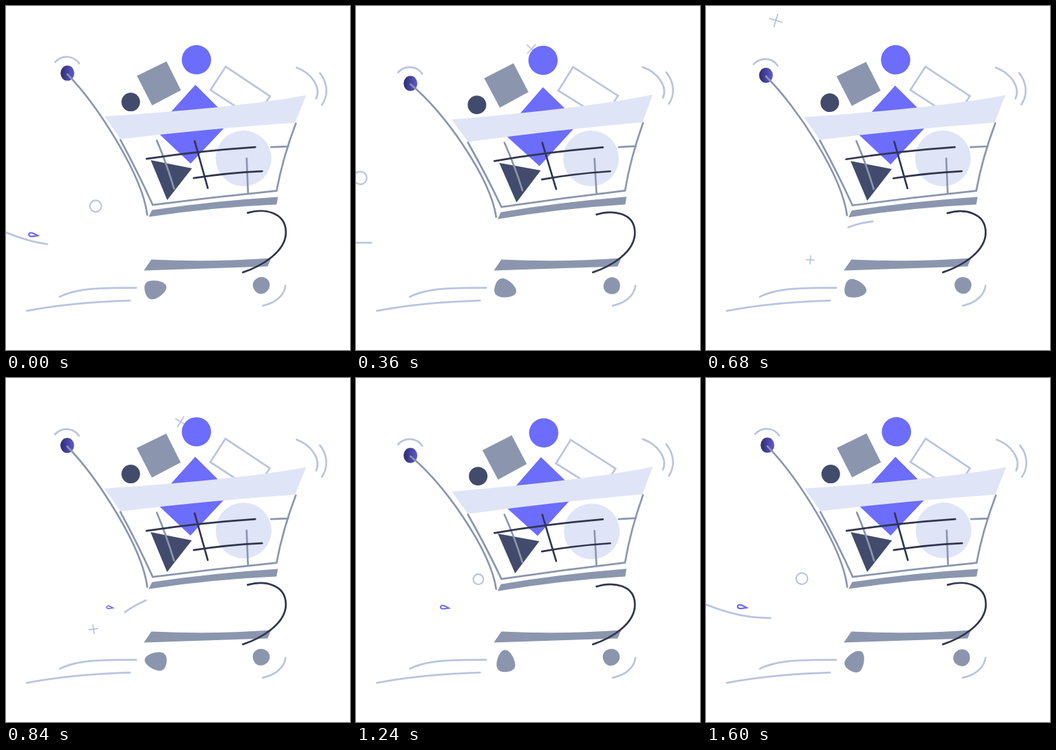
An HTML page for the animation above (1.64 s loop, 500x500 px).

```html
<!DOCTYPE html>
<html lang="en">
<head>
<meta charset="utf-8">
<title>Shopping cart</title>
<style>
  html, body { margin: 0; height: 100%; overflow: hidden; background: #fff; }
  svg { display: block; width: 100%; height: 100%; }
  .line { fill: none; stroke-width: 2.7; stroke-linecap: round; }
  .pale { stroke: #bac4e0; }
  .gray { stroke: #8b96ae; }
  .ink { stroke: #31364f; }
  .thin { stroke-width: 1.7; }
</style>
</head>
<body>
<svg viewBox="-.3 -.6 500 500">
  <defs>
    <linearGradient id="knob">
      <stop offset=".1" stop-color="#333073"/>
      <stop offset="1" stop-color="#5f5ad6"/>
    </linearGradient>
  </defs>

  <g class="line pale">
    <path d="M78 422C105 408 150 409 189 409M30 442.5C80 433 130 429 180 427.5M406 406C404 420 392 431 373 435"/>
    <path id="trailA" pathLength="1" d="M253 312Q200 312 150 358"/>
    <path id="trailB" pathLength="1" d="M160 342C130 349 90 350 62 346Q25 341 -20 320"/>
    <path id="trailC" pathLength="1" d="M153 384C120 358 70 342 0 343.5L-25 345"/>
    <circle id="ring" stroke-width="2.2"/>
    <path id="plusA" class="thin" d="M-9 0H9M0 -9V9"/>
    <path id="plusB" class="thin" d="M-9 0H9M0 -9V9"/>
    <path id="plusC" class="thin" d="M-6 0H6M0 -6V6"/>
  </g>
  <path id="drop" class="line" stroke="#6c6cfb" style="stroke-width:2.2" d="M-7 0C-5 -5 2 0 6 2C0 3 -7 5 -7 0Z"/>

  <g fill="#8b96ae">
    <path d="M211 368Q300 372 385 366L380 378Q290 381 200 384Z"/>
    <path id="rear" d="M16 0C16 7 3 13.5 -6 13.5C-13 13.5 -16 8 -16 0C-16 -8 -13 -13.5 -6 -13.5C3 -13.5 16 -7 16 0Z"/>
    <path id="front" d="M11 0C11 7 5 12 -2 12C-9 12 -13.500 7 -13.500 0C-13.500 -7 -9 -12 -2 -12C5 -12 11 -7 11 0Z"/>
  </g>

  <g id="cart">
    <path id="diamond" fill="#6c6dfd" d="M275 114L327 166L268 228.500L216 179.500Z"/>
    <path id="square" fill="#8b96ae" d="M233 80L254 122L212 144L190 101Z"/>
    <circle id="ball" fill="#6c6dfd" cx="276.5" cy="77.5" r="21.3"/>
    <circle id="dot" fill="#424b6b" cx="181" cy="139" r="13.5"/>
    <path id="box" class="line pale" d="M319 87.500L383.500 130.500L361.500 163.500L297 121.500Z"/>
    <circle id="disc" fill="#e0e4f7" cx="345" cy="221" r="40.5"/>
    <path id="triangle" fill="#424b6b" d="M210 223.500L270 235.500L234 281.500Z"/>
    <path fill="#e0e4f7" d="M143 160Q350 146 436 129L420 169Q292 178 166 193Z"/>
    <path fill="#8b96ae" d="M212 296Q300 283 395 277L393 288Q300 292 207 306Z"/>
    <path class="line gray" d="M166 194Q191 240 213 288.500Q302 277 393 268Q402 220 421 170M385 204.500L410 203.500M219 195Q233 228 244 265M349.500 221L351.500 272"/>
    <path class="line ink" d="M204 221.500Q280 210 362 204.500M274 196L293 264M272.500 249.500Q320 242 372 239.500"/>
    <path class="line pale" d="M422 89C444 97 458 118 450.500 134M456 97C468 112 468 130 459 143"/>
  </g>

  <g id="grip">
    <ellipse cx="89" cy="97" rx="10" ry="11" fill="url(#knob)"/>
    <path class="line pale" d="M71 81C81 70 98 71 106 83"/>
  </g>
  <path id="handle" class="line gray"/>
  <path id="hook" class="line ink"/>
</svg>
<script>
const FRAMES = 41, STEP = 40;
const $ = id => document.getElementById(id);
const place = (id, x, y, angle = 0, scale = 1) =>
  $(id).setAttribute('transform', `translate(${x} ${y}) rotate(${angle}) scale(${scale})`);
const show = (id, on) => $(id).style.display = on ? '' : 'none';
const ease = (n, from, to) => {
  const p = Math.min(1, Math.max(0, (n - from) / (to - from)));
  return (1 - Math.cos(Math.PI * p)) / 2;
};

// Drift of each item: [x, y] per sway, then [x, y] per bend
const drift = {
  diamond: [1.4, 1.6, 0, 0], square: [1.3, 0, 0, 0], ball: [-.5, -.4, 1.3, -.7],
  dot: [-.9, .5, 0, 0], box: [1.8, -.6, 0, 0], disc: [-.6, -.7, 0, 0], triangle: [1, .9, 0, 0]
};

function trail(id, head, tail) {
  const { style } = $(id);
  style.strokeDasharray = `${head - tail} 3`;
  style.strokeDashoffset = -tail;
  show(id, head - tail > .002);
}

function plus(id, n, last, x, y, accel, slope, angle) {
  const d = accel * n * n;
  show(id, n > 0 && n <= last);
  place(id, x - d, y - d * slope, angle, .9 + n * .014);
}

function draw(f) {
  const since = start => (f - start + FRAMES) % FRAMES;
  const bend = (1 - Math.cos(Math.PI * f / 10)) / 2;
  const sway = Math.sin(Math.PI * f / 20);

  $('cart').setAttribute('transform', `rotate(${-1.06 * bend} 380 395)`);
  for (const [id, [sx, sy, bx, by]] of Object.entries(drift))
    place(id, sx * sway + bx * bend, sy * sway + by * bend);

  place('grip', -10.4 * bend, 15.3 * bend);
  const at = (x, y, dx, dy) => `${x + dx * bend} ${y + dy * bend} `;
  $('handle').setAttribute('d', `M${at(89, 98.5, -10.4, 15)}C${at(133, 144, -8, 6)}` +
    at(198, 245, -3, 3) + at(205, 303, -1.6, 3.2));
  $('hook').setAttribute('d', `M${at(351, 300, -1.8, 2.6)}C${at(375, 293, -1.8, 2)}` +
    `${at(406, 299, -1.5, 1)}${at(406.5, 328, -1.5, 0)}C${at(407, 357, -1, 0)}370 378 344 386.5`);

  place('rear', 217.2, 410.7, -15 + f * 5 * 360 / FRAMES);
  place('front', 372, 404.7, -30 + f * 4 * 360 / FRAMES);

  let n = since(9);
  trail('trailA', ease(n, 0, 18), ease(n, 5, 20));
  n = since(32);
  trail('trailB', ease(n, 1, 7), ease(n, 4.5, 13));
  n = since(1);
  trail('trailC', ease(n, 0, 5), ease(n, 4, 10));

  plus('plusA', since(5), 15, 274, 67, 1.2, .27, -15 + 8 * (f - 13));
  plus('plusB', since(17), 11, 274, 78, 1.28, .73, -27 + 8 * (f - 25));
  plus('plusC', since(10), 19, 168, 371, .34, .16, 15 - 3 * (f - 13));

  n = since(31);
  let d = .475 * n * n;
  show('ring', n < 21);
  $('ring').setAttribute('r', 7.4 + n * .1);
  place('ring', 177.5 - d, 292 - 13 * (d / 106.5) ** 2.5);

  n = since(20);
  d = .055 * n ** 2.5;
  show('drop', n > 0 && n < 27);
  place('drop', 151 - d, 332.2 - d * .01, 0, Math.min(1, .7 + n * .02));
}

function tick(now) {
  draw(Math.floor(now / STEP) % FRAMES);
  requestAnimationFrame(tick);
}
draw(0);
requestAnimationFrame(tick);
</script>
</body>
</html>
```
